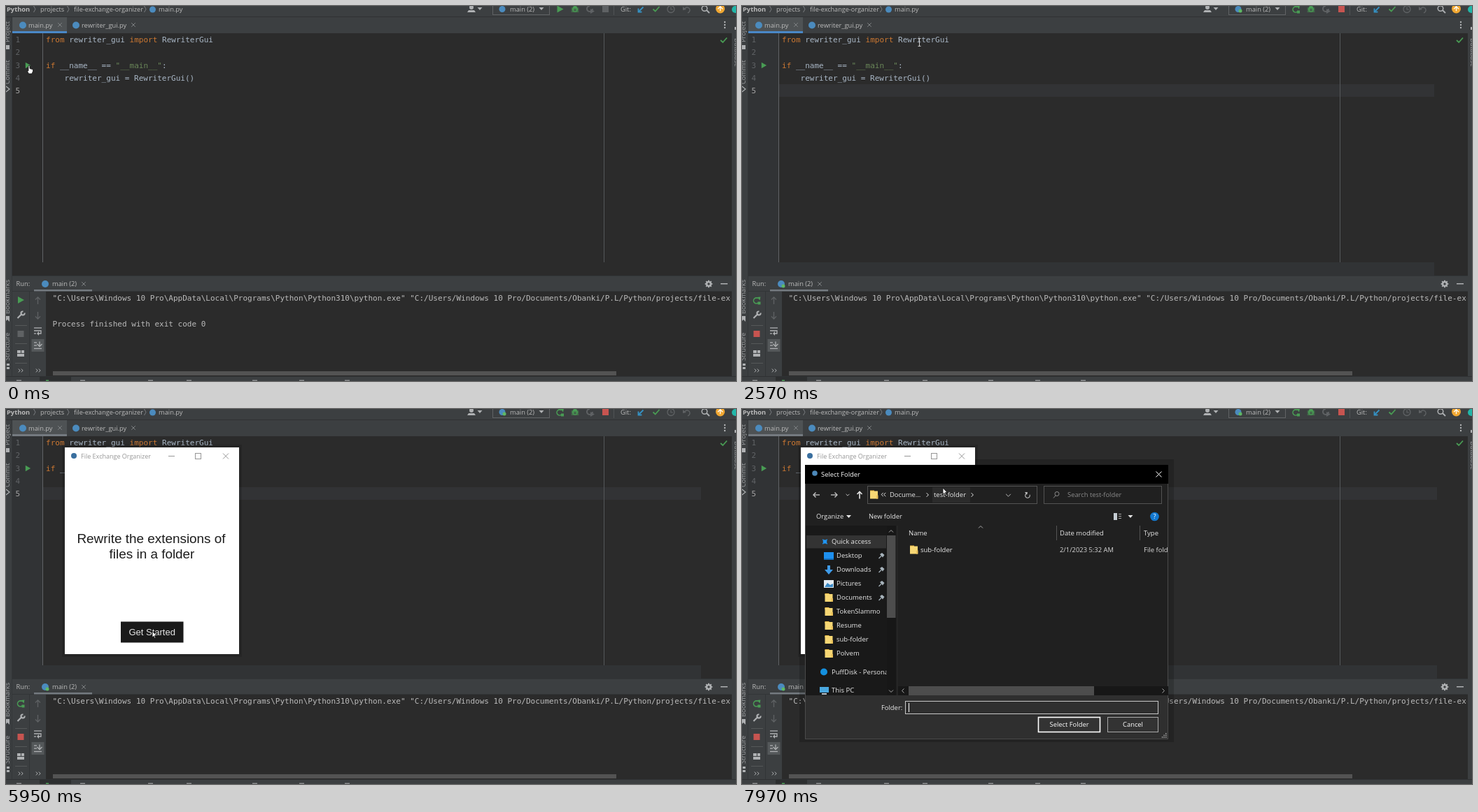
Animation of 1043x537 px, one loop 8 s. Source, as an HTML page with a canvas:

```html
<!DOCTYPE html>
<html lang="en">
<head>
<meta charset="utf-8">
<title>Run and pick a folder</title>
<style>
html, body { margin: 0; width: 100%; height: 100%; overflow: hidden; background: #2b2b2b; }
canvas { display: block; }
</style>
</head>
<body>
<canvas id="stage" width="1043" height="537"></canvas>
<script>
const LOOP = 8000, W = 1043, H = 537;
const UI = '"Open Sans", "Noto Sans", sans-serif';
const MONO = '"DejaVu Sans Mono", monospace';
const ARIAL = '"Liberation Sans", sans-serif';
const PANEL = '#3c3f41', EDITOR = '#2b2b2b', LABEL = '#bbbbbb', ICON = '#afb1b3', DIM = '#5f6264';
const GREEN = '#499c54', RED = '#c75450', PY = '#4b8bbe', FOLDER = '#f7d774';

const stage = document.getElementById('stage').getContext('2d');
const buffer = Object.assign(document.createElement('canvas'), { width: W, height: H }).getContext('2d');
let g = stage;

// Drawing helpers
function rect(x, y, w, h, color) { g.fillStyle = color; g.fillRect(x, y, w, h); }
function box(x, y, w, h, color, width = 1) {
  g.strokeStyle = color; g.lineWidth = width;
  g.strokeRect(x + .5, y + .5, w - 1, h - 1);
}
function trace(points) {
  g.beginPath();
  for (let i = 0; i < points.length; i += 2) g.lineTo(points[i], points[i + 1]);
}
function line(color, width, ...points) {
  trace(points); g.strokeStyle = color; g.lineWidth = width; g.stroke();
}
function poly(color, ...points) { trace(points); g.closePath(); g.fillStyle = color; g.fill(); }
function disc(x, y, r, color) {
  g.beginPath(); g.arc(x, y, r, 0, 7); g.fillStyle = color; g.fill();
}
function arc(x, y, r, from, to, color, width = 1.3) {
  g.beginPath(); g.arc(x, y, r, from, to); g.strokeStyle = color; g.lineWidth = width; g.stroke();
}
function write(str, x, y, color, font, align = 'left') {
  g.font = font; g.fillStyle = color; g.textAlign = align; g.fillText(str, x, y);
}
function label(str, x, cy, color = LABEL, size = 9.3, align = 'left') {
  write(str, x, Math.round(cy + size * .36), color, `${size}px ${UI}`, align);
}
function mono(str, x, y, color) { write(str, x, Math.round(y), color, `11.03px ${MONO}`); }
function clipped(x, y, w, h, draw) {
  g.save(); g.beginPath(); g.rect(x, y, w, h); g.clip(); draw(); g.restore();
}
function turned(str, x, y, angle) {
  g.save(); g.translate(x, y); g.rotate(angle); write(str, 0, 0, '#a0a2a4', `9.3px ${UI}`); g.restore();
}
function layer(alpha, draw) {
  buffer.clearRect(0, 0, W, H);
  g = buffer; draw(); g = stage;
  g.globalAlpha = alpha; g.drawImage(buffer.canvas, 0, 0); g.globalAlpha = 1;
}

// Small icons
function cross(x, y, r, color, width = 1) {
  line(color, width, x - r, y - r, x + r, y + r);
  line(color, width, x - r, y + r, x + r, y - r);
}
function chevron(x, y, dx, dy, color, width = 1) {
  line(color, width, x - dx - 2 * dy, y - dy - 2 * dx, x + dx, y + dy, x - dx + 2 * dy, y - dy + 2 * dx);
}
function arrow(x, y, dx, dy, len, color, width = 1.3) {
  const ex = x + dx * len, ey = y + dy * len, k = 3.5;
  line(color, width, x - dx * len, y - dy * len, ex, ey);
  line(color, width, ex - (dx - dy) * k, ey - (dy + dx) * k, ex, ey, ex - (dx + dy) * k, ey - (dy - dx) * k);
}
function caretDown(x, y, color = ICON) { poly(color, x - 3.5, y - 2, x + 3.5, y - 2, x, y + 2); }
function play(x, y, s = 4.5) { poly(GREEN, x - s, y - s - .5, x + s, y, x - s, y + s + .5); }
function rerun(x, y) {
  arc(x, y, 4, .9, 5.3, GREEN, 1.6);
  poly(GREEN, x + 1, y - 5, x + 6, y - 5.5, x + 5, y - .5);
  rect(x + 2, y + 1.5, 4, 4, GREEN);
}
function bug(x, y, r) {
  disc(x, y, r, GREEN); disc(x, y - r * .4, r * .9, GREEN);
  for (const k of [-.6, .2, 1]) line(GREEN, 1, x - r - 1.5, y + k * r * .8, x + r + 1.5, y + k * r * .8);
  rect(x - r * .5, y - .8, r, 1, PANEL); rect(x - r * .5, y + 1.2, r, 1, PANEL);
}
function check(x, y) { line(GREEN, 1.8, x - 4.5, y, x - 1.3, y + 3, x + 4.5, y - 3.5); }
function folder(x, y) {
  rect(x, y - 6, 6, 3, '#e3b341'); rect(x, y - 5, 11, 11, FOLDER); rect(x + 9, y + 1, 2.5, 5, '#e9c05a');
}

// Pointer
const pointerPath = [
  [0, 33, 85, 'hand'], [990, 44, 90, 'arrow'], [1110, 53, 91, 'arrow'], [1610, 53, 91, 'hand'],
  [2000, 112, 82, 'beam'], [2200, 190, 64, 'beam'], [2570, 253, 52, 'beam'], [2950, 257, 82, 'arrow'],
  [3100, 262, 130, 'arrow'], [3250, 261, 175, 'arrow'], [3400, 257, 205, 'arrow'], [3520, 254, 222, 'arrow'],
  [3640, 252, 232, 'arrow'], [4560, 239, 250, 'arrow'], [4680, 228, 276, 'arrow'], [4830, 218, 300, 'arrow'],
  [5000, 212, 313, 'arrow'], [5140, 209, 318, 'arrow'], [7170, 225, 290, 'arrow'], [7340, 245, 250, 'arrow'],
  [7700, 262, 190, 'arrow'], [7830, 280, 140, 'arrow'], [7970, 287, 113, 'arrow']
];
const pointers = {
  hand() {
    g.beginPath();
    g.moveTo(-1, 1); g.quadraticCurveTo(0, -1, 1, 1);
    g.lineTo(1, 4.5); g.lineTo(4.5, 5.5); g.quadraticCurveTo(6, 6, 5.5, 8.5);
    g.lineTo(4, 12); g.lineTo(-.5, 12); g.lineTo(-3, 7.5); g.lineTo(-1, 8); g.closePath();
  },
  arrow() { trace([0, 0, 0, 9, 2, 7.3, 3.3, 10.2, 4.6, 9.6, 3.4, 6.7, 6, 6.4]); g.closePath(); }
};
function pointer(t) {
  const [, x, y, kind] = pointerPath.findLast(k => k[0] <= t);
  g.save(); g.translate(x, y);
  if (kind === 'beam') {
    line('#d0d0d0', 1, .5, -5, .5, 5);
    line('#d0d0d0', 1, -1.5, -5.5, 2.5, -5.5);
    line('#d0d0d0', 1, -1.5, 5.5, 2.5, 5.5);
  } else {
    pointers[kind]();
    g.fillStyle = '#fff'; g.fill();
    g.strokeStyle = '#111'; g.lineWidth = .8; g.stroke();
  }
  g.restore();
}

// IDE
function toolbar(running) {
  rect(0, 0, W, 15, PANEL);
  rect(0, 15, W, 1, '#2f3133');
  write('Python', 1, 8, LABEL, `bold 9.3px ${UI}`);
  label('projects', 49, 4.7, LABEL, 9.2);
  label('file-exchange-organizer', 97, 4.7, LABEL, 9.1);
  label('main.py', 218, 4.7);
  for (const x of [41, 89, 199]) line('#7a7d80', 1, x - 1.5, 0, x + 1, 4.5, x - 1.5, 9);
  disc(209.5, 5, 4.5, PY);

  disc(665, 2, 3, ICON); poly(ICON, 659, 9, 661, 6, 669, 6, 671, 9);
  caretDown(677, 4);
  box(695, -4, 82, 17, '#616365');
  disc(709, 4.5, 4.5, PY);
  if (running) disc(712, 7, 2.5, '#5fb865');
  label('main (2)', 720, 4.7);
  caretDown(765, 4);
  running ? rerun(791, 5) : play(792, 4.5);
  bug(813, 5, 3.8);
  arc(834, 4, 4, 0, 4.7, DIM, 2); poly(DIM, 835, 4, 841, 7.5, 835, 11);
  rect(852, 0, 9, 9, running ? RED : DIM);
  rect(868, 0, 1, 13, '#515456');
  label('Git:', 878, 4.7);
  arrow(907, 5, -.7, .7, 5, '#3592c4', 1.8);
  check(929, 4.5);
  arc(950, 4.5, 5, 0, 7, DIM); line(DIM, 1.2, 950, 1.5, 950, 5, 953, 5);
  arc(973, 6, 4, 3.6, 7.6, DIM, 1.5); poly(DIM, 967, 1, 967, 6, 972, 5);
  arc(998, 3.5, 3.8, 0, 7, ICON, 1.5); line(ICON, 1.8, 1001, 6, 1005, 10);
  disc(1020.5, 4, 6.5, '#f0a732'); arrow(1020.5, 4, 0, -1, 3.2, '#fff');
  disc(1042, 5, 5, '#21b6a8');
}

function stripes() {
  rect(0, 16, 9, 515, PANEL);
  rect(8, 16, 1, 515, '#333638');
  rect(1037, 16, 6, 515, PANEL);
  const up = -Math.PI / 2;
  turned('Project', 5, 52, up);
  turned('Commit', 5, 112, up);
  turned('Bookmarks', 5, 441, up);
  turned('Structure', 5, 508, up);
  rect(0, 56, 5, 6, ICON);
  line(ICON, 1.2, 0, 115, 5, 119, 0, 123);
  poly(ICON, 0, 444, 5, 444, 5, 452, 2, 449, 0, 451);
  rect(1, 512, 4, 3, ICON); rect(1, 517, 4, 3, ICON);
  turned('Database', 1041, 46, -up);
  rect(1041, 30, 2, 4, ICON);
}

function tabs(focused) {
  rect(9, 16, 1028, 23, PANEL);
  rect(9, 16, 78, 23, '#4e5254');
  rect(9, 36, 78, 3, focused ? '#4a88c7' : '#747a80');
  disc(24, 27.5, 5, PY); disc(100, 27.5, 5, PY);
  label('main.py', 32, 27.7); cross(77, 27, 2.8, '#7f8284');
  label('rewriter_gui.py', 108, 27.7); cross(182, 27, 2.8, '#7f8284');
  for (const y of [23, 27, 31]) disc(1027, y, 1.2, ICON);
}

function code(row, col, str, color = '#a9b7c6') { mono(str, 57 + col * 6.64, 52 + row * 18.25, color); }
function editor(t) {
  rect(9, 39, 1028, 348, EDITOR);
  if (t >= 410) {
    const right = t < 2710 ? 989 : 993;
    rect(9, 39, 43, 348, '#313335');
    rect(53, 112, right - 53, 18, '#323335');
    rect(9, 367, right - 9, 19, '#313335');
  }
  rect(52, 39, 1, 328, '#606366');
  rect(854, 39, 1, 328, '#55585a');
  for (let n = 1; n < 6; n++) mono(n, 13.5, 52 + (n - 1) * 18.25, n < 5 ? '#606366' : '#a4a3a3');
  play(31.5, 85, 3.7);
  const key = '#cc7832';
  code(0, 0, 'from', key); code(0, 5, 'rewriter_gui');
  code(0, 18, 'import', key); code(0, 25, 'RewriterGui');
  code(2, 0, 'if', key); code(2, 3, '__name__ ==');
  code(2, 15, '"__main__"', '#6a8759'); code(2, 25, ':');
  code(3, 4, 'rewriter_gui = RewriterGui()');
  check(1025.5, 49);
}

function runPanel(running) {
  rect(9, 387, 1028, 144, PANEL);
  rect(9, 386, 1028, 1, '#323537');
  rect(57, 409, 980, 122, EDITOR);
  rect(9, 408, 1028, 1, '#323537');
  rect(33, 409, 1, 122, '#323537');
  label('Run:', 14.5, 398);
  disc(56, 398, 5, PY);
  if (running) disc(59, 401, 2.5, '#5fb865');
  label('main (2)', 66, 398); cross(111, 398, 2.8, '#7f8284');
  rect(40, 406, 83, 2.5, '#747a80');
  for (let i = 0; i < 4; i++) {
    const c = Math.cos(i * Math.PI / 4) * 5.3, s = Math.sin(i * Math.PI / 4) * 5.3;
    line(ICON, 2, 1004 - c, 398 - s, 1004 + c, 398 + s);
  }
  disc(1004, 398, 4, ICON); disc(1004, 398, 1.7, PANEL);
  rect(1021, 397, 10, 1.5, ICON);

  running ? rerun(20.5, 422) : play(21.5, 421);
  line(ICON, 2.2, 16.5, 447, 23, 440.5); arc(24, 440, 2.6, -.2, 4.9, ICON, 2);
  for (const y of [457, 483, 511]) rect(13, y, 17, 1, '#555859');
  rect(16.5, 465, 9, 9, running ? RED : DIM);
  rect(16, 493, 5, 4, ICON); rect(22, 493, 4, 4, ICON); rect(16, 498, 10, 4, ICON);
  for (const x of [19, 23, 44, 48]) chevron(x, 522, 1.2, 0, ICON);
  arrow(45.5, 422, 0, -1, 5, DIM); arrow(45.5, 443, 0, 1, 5, DIM);
  line(ICON, 1.3, 40, 461, 51, 461); line(ICON, 1.3, 40, 465, 50, 465, 50, 469, 46, 469);
  line(ICON, 1.3, 40, 469, 43, 469); poly(ICON, 47, 466, 44, 469, 47, 472);
  rect(36.5, 477, 18, 18, '#54585a');
  line(ICON, 1.3, 40, 482, 44, 482); line(ICON, 1.3, 40, 486, 44, 486); line(ICON, 1.3, 40, 490.5, 51, 490.5);
  arrow(48, 484, 0, 1, 3.5, ICON);

  clipped(57, 409, 979, 122, () => {
    mono(String.raw`"C:\Users\Windows 10 Pro\AppData\Local\Programs\Python\Python310\python.exe" "C:/Users/Windows 10 Pro/Documents/Obanki/P.L/Python/projects/file-exchange`, 66.5, 422, LABEL);
    if (!running) mono('Process finished with exit code 0', 66.5, 459, LABEL);
  });
  rect(67, 523, 805, 6, '#535353');
}

function statusBar() {
  rect(0, 530, W, 7, PANEL);
  rect(0, 530, W, 1, '#2f3133');
  rect(48, 531, 45, 6, '#2d2f30');
  for (const x of [18, 109, 206, 261, 355, 422, 487]) rect(x - 3, 535.5, 7, 1.5, '#8b8d8f');
  rect(57, 535.5, 4, 1.5, GREEN);
}

function popup(selected) {
  rect(34, 79, 185, 63, PANEL);
  box(34, 79, 185, 63, '#555859');
  if (selected) rect(35, 84, 183, 18, '#4b6eaf');
  play(46, 93, 3.7);
  label("Run 'main (2)'", 57, 93);
  label('Ctrl+Shift+F10', 212, 93, selected ? LABEL : '#8c8e90', 9.3, 'right');
  bug(46, 110, 3.3);
  label("Debug 'main (2)'", 57, 110);
  rect(35, 120, 183, 1, '#515456');
  label('Modify Run Configuration...', 57, 131);
}

// Application window
function shadow(x, y, w, h, m, strength) {
  rect(x - m, y - m, w + 2 * m, h + 2 * m, `rgba(0,0,0,${strength})`);
}
function appWindow(active, pressed) {
  const ink = active ? '#1a1a1a' : '#969696';
  rect(84, 55, 249, 296, '#fff');
  disc(97, 67, 4, '#3a6f9f');
  label('File Exchange Organizer', 107, 68, ink, 9);
  line(ink, 1, 232, 67.5, 241, 67.5);
  box(270, 63, 9, 9, ink);
  cross(314, 67.5, 4, ink);
  const title = `18.9px ${ARIAL}`;
  write('Rewrite the extensions of', 207.5, 192, '#1c1c1c', title, 'center');
  write('files in a folder', 208.5, 214, '#1c1c1c', title, 'center');
  rect(164, 304.5, 89.5, 30, '#1a1a1a');
  const push = pressed ? 1 : 0;
  write('Get Started', 208.7 + push, 324 + push, '#e6e6e6', `13px ${ARIAL}`, 'center');
}

// Folder dialog
const SIDE = '#191919', BODY = '#202020', FOOT = '#2f2f2f', THUMB = '#4d4d4d', SNOW = '#e8e8e8';
function blankDialog() {
  const white = '#fff';
  rect(92, 82, 514, 389, white);
  rect(92, 82, 514, 25, '#000');
  disc(105, 93, 3.8, '#4c88b8');
  label('Select Folder', 114, 95, white, 9.4);
  cross(592, 94.5, 4, white);
  rect(92, 167, 128.5, 242, SIDE);
  rect(207.5, 181, 13, 187, THUMB);
  chevron(213.5, 175, 0, -1.5, '#aaa'); chevron(213.5, 402, 0, 1.5, '#aaa');
  rect(238, 394, 354, 15, '#171717'); rect(238, 394, 263, 15, THUMB);
  rect(92, 408.5, 514, 62.5, FOOT);
  rect(199, 419, 30, 13, white);
  rect(233, 416, 359, 19, white); box(234, 417, 357, 17, '#333');
  rect(421, 439, 89, 22, white); rect(519, 439, 73, 22, white);
  rect(592, 456, 14, 15, white);
}

function sidebar() {
  rect(91, 167, 129, 243, SIDE);
  rect(92, 181, 114, 18.5, '#333');
  const blue = '#2196f3';
  cross(118.5, 190, 3.2, blue, 1.5); disc(118.5, 190, 2.8, blue);
  label('Quick access', 128, 190, SNOW, 9.5);
  rect(117, 205, 14, 9, '#1e90ef'); rect(117, 214, 14, 2, '#1370bf');
  rect(122, 224, 4, 6, '#3f9be8'); poly('#3f9be8', 118, 230, 130, 230, 124, 237);
  rect(117, 245, 14, 11, '#e6eef5'); poly('#3a8ac6', 118, 255, 122, 249, 126, 252, 130, 250, 130, 255);
  const places = ['Desktop', 'Downloads', 'Pictures', 'Documents', 'TokenSlammo', 'Resume', 'sub-folder', 'Polvem'];
  places.forEach((name, i) => {
    const y = 210 + i * 20;
    if (i > 2) folder(118.5, y);
    label(name, 135, y, SNOW, 9.5);
    if (i < 4) {
      line('#a8b4bc', 1.2, 195.5, y + 4, 199, y + .5);
      poly('#a8b4bc', 197, y - 2, 200, y - 4, 203.5, y - 1, 201, y + 2.5);
    }
  });
  disc(117, 376.5, 5, '#1490df');
  clipped(92, 360, 114.5, 50, () => {
    label('PuffDisk - Personal', 128, 376.5, SNOW, 9.5);
    rect(111, 398, 13, 8, '#4aa8e0'); rect(114, 407, 7, 2, '#b8c4cc');
    label('This PC', 128, 403, SNOW, 9.5);
  });
  rect(207, 167, 13, 243, '#171717');
  rect(207, 181, 12.5, 118, THUMB);
  chevron(213, 175, 0, -1.5, '#aaa'); chevron(213, 404, 0, 1.5, '#aaa');
}

function fileList() {
  rect(221.5, 167, 1, 243, '#2b2b2b');
  label('Name', 238, 178, SNOW, 9.5);
  chevron(341, 169, 0, -1.5, '#aaa');
  rect(449, 167, 1, 21, '#555'); rect(568, 167, 1, 21, '#555');
  label('Date modified', 454, 178, SNOW, 9.5);
  label('Type', 574, 178, SNOW, 9.5);
  folder(240, 201.5);
  label('sub-folder', 255, 202, SNOW, 9.5);
  label('2/1/2023 5:32 AM', 454, 202, '#d8d8d8', 9.4);
  clipped(569, 190, 39.5, 25, () => label('File folder', 574, 202, '#d8d8d8', 9.5));
  rect(223, 397, 386, 13, '#171717');
  rect(238, 397, 265, 13, THUMB);
  chevron(230, 403.5, -1.5, 0, '#aaa'); chevron(602, 403.5, 1.5, 0, '#aaa');
}

function dialog(filled, hover, caret) {
  const edge = '#535353', grey = '#8a8a8a';
  rect(90, 80, 519, 393, BODY);
  rect(90, 410, 519, 63, FOOT);
  box(90, 80, 519, 393, '#4a4a4a');
  rect(90, 80, 519, 27, '#000');
  disc(104, 92, 3.8, '#4c88b8');
  label('Select Folder', 113, 94, '#fff', 9.4);
  cross(595.5, 93.5, 4, '#fff');

  arrow(106.5, 123, -1, 0, 4.5, '#c8c8c8'); arrow(131.5, 123, 1, 0, 4.5, '#c8c8c8');
  chevron(151, 123, 0, 1.2, '#bbb'); arrow(168, 123.5, 0, -1, 5, SNOW, 1.6);
  box(179, 110, 243, 26, edge); box(431, 110, 169, 26, edge);
  folder(183, 122.5);
  if (hover) rect(272, 112, 54, 22, '#2b2b2b');
  if (filled) {
    chevron(200.5, 122.5, -1.3, 0, SNOW); chevron(204, 122.5, -1.3, 0, SNOW);
    label('Docume...', 211, 123, SNOW, 9.4);
    chevron(265, 123, 1.4, 0, SNOW);
    label('test-folder', 274, 123, SNOW, 9.5);
    chevron(329, 123, 1.4, 0, SNOW);
  }
  chevron(380.5, 123.5, 0, 1.7, '#bbb');
  arc(408, 124, 3.3, -.4, 4.6, '#bbb', 1.1); poly('#bbb', 404, 119, 408, 119, 407, 123);
  arc(450, 121.5, 3, 0, 7, grey, 1); line(grey, 1, 448, 124, 445, 127.5);
  label('Search test-folder', 465, 123, grey, 9.4);

  label('Organize', 106, 154, SNOW, 9.4); caretDown(152.5, 154, SNOW);
  label('New folder', 181, 154, SNOW, 9.4);
  rect(531, 149, 5, 10, '#c4ccd2');
  for (const y of [150, 153, 156]) rect(538, y, 4, 1, '#aaa');
  caretDown(555, 154, SNOW);
  disc(589.5, 154, 6.3, '#1278d0'); label('?', 589.5, 154, '#fff', 9.5, 'center');

  if (filled) { sidebar(); fileList(); }

  label('Folder:', 199, 428, SNOW, 9.4);
  box(233, 418, 362, 19, '#c8c8c8');
  if (caret) rect(238, 421, 1, 13, '#fff');
  rect(423, 441, 89, 22, '#333'); box(423, 441, 89, 22, '#fff', 1.6);
  label('Select Folder', 467.5, 452, '#fff', 9.4, 'center');
  rect(522, 441, 73, 22, '#333'); box(522, 441, 73, 22, '#a8a8a8');
  label('Cancel', 558.5, 452, '#fff', 9.4, 'center');
  for (let i = 0; i < 3; i++) for (let j = 0; j <= i; j++) rect(605 - j * 2.6, 464 + i * 2.6, 1.5, 1.5, '#aaa');
}

function windows(t) {
  const active = t < 5950;
  shadow(84, 55, 249, 296, active ? 7 : 4, .14);
  if (t >= 6830) rect(82, 72, 535, 405, 'rgba(0,0,0,.18)');
  else if (t >= 6670) shadow(92, 82, 514, 389, 6, .1);

  layer(t < 2950 ? .945 : 1, () => appWindow(active, t >= 5430 && t < 5700));
  if (t >= 6830) dialog(t >= 7000, t >= 7970, t >= 7700);
  else if (t >= 6670) layer(.83, blankDialog);
}

function render(t) {
  const running = t >= 1900;
  editor(t);
  tabs(t < 2710);
  runPanel(running);
  stripes();
  toolbar(running);
  statusBar();
  if (t >= 690 && t < 1610) popup(t >= 990);
  if (t >= 2710) windows(t);
  pointer(t);
}

function tick() {
  render(performance.now() % LOOP);
  requestAnimationFrame(tick);
}
tick();
</script>
</body>
</html>
```
